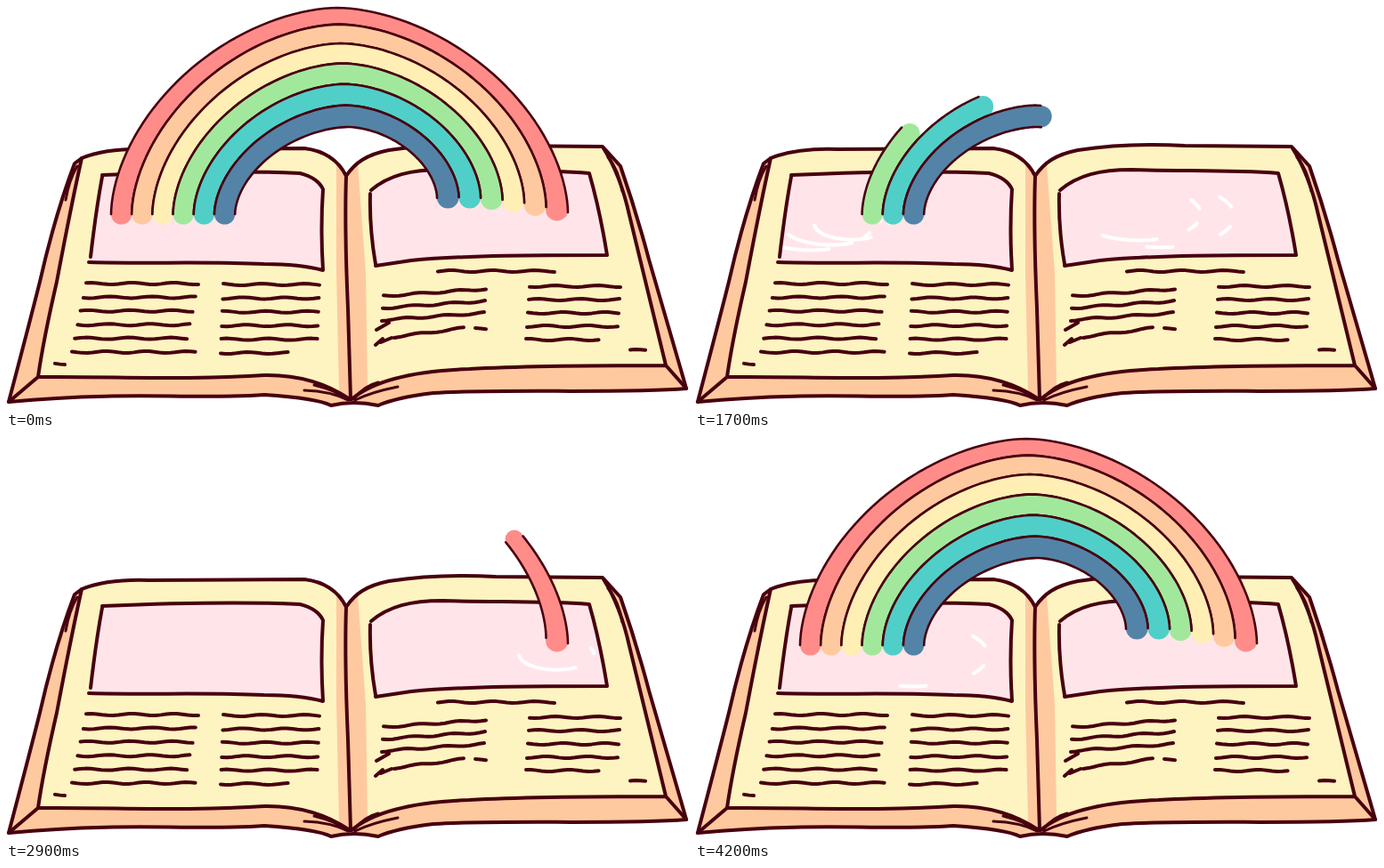
Animation of 767x453 px, one loop 4.3 s. Source, as an HTML page:

```html
<!DOCTYPE html>
<html lang="en">
<head>
<meta charset="utf-8">
<title>Rainbow book</title>
<style>
html, body { margin: 0; width: 100%; height: 100%; overflow: hidden; background: #fff; }
svg { display: block; width: 767px; height: 453px; }
.ink, #water { fill: none; stroke: #47000f; stroke-width: 4; stroke-linecap: round; stroke-linejoin: round; }
#water { stroke: #fff; }
#rainbow .ink { stroke-width: 2.6; }
.fine { stroke-width: 3; }
</style>
</head>
<body>
<svg viewBox="0 0 767 453">
  <defs>
    <path id="cover" d="M77,177 L85,171 C105,163 130,160 160,161 L335,160 C360,163 374,175 382,191 C392,176 405,167 430,162 C470,156 510,155 550,157 L670,158 L690,180 Q708,232 722,285 L764,430 C690,436 560,430 480,435 Q438,440 418,449 Q390,443 365,449 Q350,441 290,437 C220,443 140,432 3,445 Q28,350 38,310 Q55,235 77,177 Z"/>
    <path id="panelL" d="M108,190 C180,187 260,185 330,188 Q350,193 356,206 Q353,250 356,297 Q330,290 290,290 C220,287 160,290 93,288"/>
    <path id="panelR" d="M410,207 C430,190 455,184 490,184 C550,186 600,184 655,188 Q667,230 675,280 C600,280 520,280 455,286 L415,292"/>
    <clipPath id="panels"><use href="#panelL"/><use href="#panelR"/></clipPath>
  </defs>

  <use href="#cover" fill="#ffc99f"/>
  <g fill="#fdf4c1">
    <path d="M85,171 C105,163 130,160 160,161 L335,160 Q358,163 371,178 L371,300 L374,432 Q340,414 290,415 C200,421 120,416 36,417 Q52,315 85,171 Z"/>
    <path d="M395,178 Q405,167 430,162 C470,156 510,155 550,157 L670,158 Q690,190 700,235 L741,404 C670,404 590,404 520,408 Q440,410 406,427 L404,300 Z"/>
  </g>
  <g fill="#ffe5ea"><use href="#panelL"/><use href="#panelR"/></g>
  <g clip-path="url(#panels)"><path id="water"/></g>

  <g class="ink">
    <use href="#cover"/>
    <use href="#panelL"/><use href="#panelR"/>
    <path d="M108,192 Q101,230 95,282 M415,290 Q408,250 409,211"/>
    <path d="M85,171 Q73,225 57,310 Q42,375 36,417 L3,445 M36,417 C120,416 200,421 290,415 Q345,414 386,442"/>
    <path d="M671,160 Q690,190 700,235 L741,404 L764,430 M741,404 C670,404 590,404 520,408 Q425,411 388,442"/>
    <path d="M382,191 Q380,250 384,340 L387,442"/>
    <path class="fine" d="M335,432 Q365,433 384,443 M346,426 Q370,432 385,442 M390,442 Q402,427 418,423 M392,443 Q410,434 440,428"/>
    <path class="fine" d="M80,180 Q71,195 67,218 M676,170 Q688,184 692,208"/>
    <path id="text"/>
  </g>
  <g id="rainbow"></g>
</svg>
<script>
const $ = q => document.querySelector(q);
const STEP = 100, LOOP = 4300, LEAVE = 1000, RETURN = 2900;
const COLORS = ['#ff8c89', '#ffc99f', '#ffefb5', '#a2e89c', '#50cfc8', '#5483a8'];
const BANDS = COLORS.length;
const line = points => 'M' + points.join('L');
const range = (n, f) => Array.from({ length: n }, (_, i) => f(i));

function add(parent, tag, attrs) {
  const el = document.createElementNS('http://www.w3.org/2000/svg', tag);
  for (const k in attrs) el.setAttribute(k, attrs[k]);
  return parent.appendChild(el);
}

// One wobbly line of handwriting
const scribble = (x, y, w, rise = 0) => line(range(Math.ceil(w / 6) + 1, i => {
  const f = i / Math.ceil(w / 6);
  return [x + w * f, y - rise * f + Math.sin(i * 0.8 + y)];
}));

// Rows of a paragraph; each starts `lean` further left, the last is shortened
const column = (x, y, w, rows, lean, last, gap = 15.4, rise = 0) => range(rows, r =>
  scribble(x - lean * r, y + gap * r, r === rows - 1 ? w * last : w, rise)).join('');

$('#text').setAttribute('d', [
  column(90, 312, 126, 6, 3.2, 1.1),
  column(244, 313, 108, 6, 0.6, 0.7),
  column(424, 326, 115, 3, 1, 1, 13.5, 8),
  column(588, 315, 102, 5, 1, 0.8, 15),
  scribble(485, 298, 131), scribble(436, 372, 78, 10), scribble(527, 363, 12),
  scribble(55, 402, 11), scribble(701, 387, 17),
  'M416,364 L430,356 M415,381 L423,374 M421,378 L433,373'
].join(''));

// Border number i, counted from the outside: a superellipse arch, f from 0 (left) to 1 (right)
function border(i, f) {
  const angle = Math.PI * f, bend = 2 / 1.77;
  const top = [372 + 2 * i, 2 + 134 * (i / BANDS) ** 1.1];
  const foot = f < 0.5 ? [118 + 23.2 * i, 234] : [631 - 24.5 * i, 215 + 17 * (1 - i / 5) ** 2];
  const u = Math.abs(Math.cos(angle)) ** bend, v = Math.sin(angle) ** bend;
  return [top[0] + (foot[0] - top[0]) * u, foot[1] + (top[1] - foot[1]) * v];
}

const bands = COLORS.map(color => {
  const g = add($('#rainbow'), 'g', {});
  return {
    g,
    fill: add(g, 'path', { fill: color }),
    caps: range(2, () => add(g, 'circle', { fill: color })),
    ink: add(g, 'path', { class: 'ink' })
  };
});

function drawBand({ g, fill, caps, ink }, i, from, to) {
  g.style.display = to > from ? '' : 'none';
  const [a, b] = [i, i + 1].map(n => range(81, s => border(n, from + (to - from) * s / 80)));
  fill.setAttribute('d', line([...a, ...b.slice().reverse()]));
  ink.setAttribute('d', line(a) + line(b));
  caps.forEach((cap, n) => {
    const [x1, y1] = a[n * 80], [x2, y2] = b[n * 80];
    cap.setAttribute('cx', (x1 + x2) / 2);
    cap.setAttribute('cy', (y1 + y2) / 2);
    cap.setAttribute('r', Math.hypot(x1 - x2, y1 - y2) / 2);
  });
}

// A ring on the water that widens and breaks up with age
function ripple(x, y, age) {
  if (age < 0 || age > 3) return '';
  const rx = 42 + 14 * age, ry = rx * 0.42;
  const arc = (mid, half) => line(range(13, s => {
    const a = (mid + half * (s / 6 - 1)) * Math.PI / 180;
    return [x + rx * Math.cos(a), y + ry * Math.sin(a)];
  }));
  return arc(117 - 9 * age, 58 - 16 * age) + arc(-12 - 5 * age, 10) + (age > 1 ? arc(28, 8) : '');
}

function draw(t) {
  const back = t >= RETURN;
  const step = Math.floor((t - (back ? RETURN : LEAVE)) / STEP);
  let rings = '';
  bands.forEach((band, i) => {
    const k = Math.max(0, Math.min(BANDS, step - i + 1));
    const tip = k === 0 ? 1 : k === BANDS ? 0 : (back ? 0.965 : 0.99) - 0.156 * k;
    drawBand(band, i, back ? tip : 0, back ? 1 : tip);
    rings += ripple(618 - 24 * i, 244 - 2 * i, step - i) + ripple(130 + 23 * i, 245, step - i - 5);
  });
  $('#water').setAttribute('d', rings);
}

const start = performance.now();
let shown = -1;
function tick() {
  const t = Math.floor(((performance.now() - start) % LOOP) / STEP) * STEP;
  if (t !== shown) draw(shown = t);
  requestAnimationFrame(tick);
}
tick();
</script>
</body>
</html>
```
